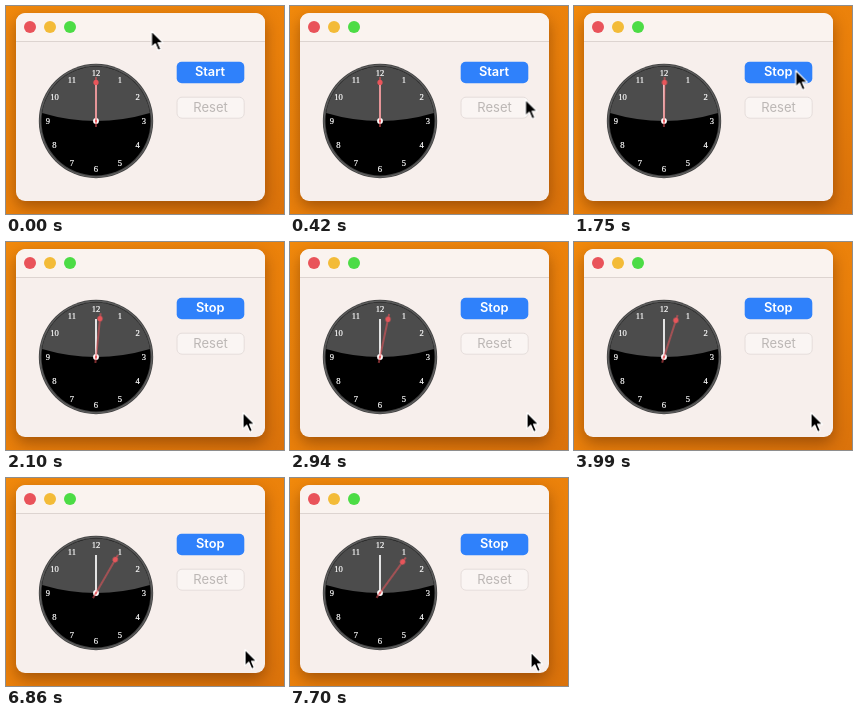
Write an HTML page that moves like this. It is 278 by 208 pixels and loops after 8000 ms.

```html
<!DOCTYPE html>
<html lang="en">
<head>
<meta charset="utf-8">
<title>Stopwatch</title>
<style>
  html, body { margin: 0; width: 100%; height: 100%; overflow: hidden; }
  body { background: linear-gradient(150deg, #f1890c, #ea800b 55%, #da720b); }
  svg { position: absolute; left: 0; top: 0; display: block; }
  .window {
    position: absolute; left: 10px; top: 7.3px; width: 249px; height: 187.4px;
    border-radius: 9px; background: #f7efec;
    box-shadow: 0 6px 15px rgba(60, 20, 0, .4);
  }
  .label { font: 600 12.8px Inter, Roboto, sans-serif; text-anchor: middle; }
  .label.disabled { font-weight: 400; font-size: 13px; }
  .numerals { font: 8.6px "Liberation Serif", "Noto Serif", serif; text-anchor: middle; fill: #fff; stroke: #fff; stroke-width: .2; }

  .cursor, .second, .press, .start, .stop { animation: 8s step-end infinite; }
  .cursor { animation-name: point; }
  .second { animation-name: tick; }
  .press { animation-name: press; }
  .start { animation-name: fade-out; }
  .stop { animation-name: fade-in; }

  /* Everything advances in 70 ms steps; 1% is 80 ms. */
  @keyframes point {
    0% { transform: translate(145.5px, 25px); }
    .875% { transform: translate(145.5px, 25px); animation-timing-function: steps(6, jump-start); }
    6.125% { transform: translate(235.5px, 93.5px); animation-timing-function: steps(5, jump-start); }
    10.5% { transform: translate(221.7px, 64.5px); }
    23.625% { transform: translate(221.7px, 64.5px); animation-timing-function: steps(4, jump-start); }
    27.125% { transform: translate(237px, 170.5px); }
    84% { transform: translate(237px, 170.5px); animation-timing-function: steps(3, jump-start); }
    86.625% { transform: translate(239px, 171.5px); }
    90.125% { transform: translate(239px, 171.5px); animation-timing-function: steps(2, jump-start); }
    91.875% { transform: translate(239px, 173px); }
    92.75% { transform: translate(239px, 173px); animation-timing-function: steps(5, jump-start); }
    97.125%, 100% { transform: translate(241px, 174.2px); }
  }
  @keyframes tick {
    0% { transform: rotate(0); }
    21.875% { transform: rotate(.8deg); }
    23.625% { transform: rotate(3.5deg); }
    24.5% { transform: rotate(6deg); }
    35.875% { transform: rotate(9deg); }
    36.75% { transform: rotate(12deg); }
    49% { transform: rotate(15deg); }
    49.875% { transform: rotate(18deg); }
    62.125% { transform: rotate(21deg); }
    63% { transform: rotate(24deg); }
    77% { transform: rotate(27deg); }
    77.875% { transform: rotate(30deg); }
    90.125% { transform: rotate(33deg); }
    91%, 100% { transform: rotate(36deg); }
  }
  @keyframes press {
    0% { fill: #2f81fb; }
    9.625% { fill: #2974ea; }
    11.375%, 100% { fill: #2f81fb; }
  }
  @keyframes fade-out {
    0% { opacity: 1; }
    11.375% { opacity: 1; animation-timing-function: steps(3, jump-start); }
    14%, 100% { opacity: 0; }
  }
  @keyframes fade-in {
    0% { opacity: 0; }
    11.375% { opacity: 0; animation-timing-function: steps(3, jump-start); }
    14%, 100% { opacity: 1; }
  }
</style>
</head>
<body>
<div class="window"></div>
<svg width="278" height="208" viewBox="0 0 278 208">
  <!-- title bar -->
  <path d="M10 35V16.3a9 9 0 0 1 9-9h231a9 9 0 0 1 9 9v18.7z" fill="#faf3ef"/>
  <path d="M10 35.5h249" stroke="#ddd4d0"/>
  <circle cx="24" cy="21" r="6" fill="#e9535a"/>
  <circle cx="44" cy="21" r="6" fill="#f3bb38"/>
  <circle cx="64" cy="21" r="6" fill="#4cdc45"/>

  <!-- buttons -->
  <rect class="press" x="170.7" y="55.8" width="67.6" height="21.4" rx="5" fill="#2f81fb"/>
  <g class="label" fill="#fff">
    <text class="start" x="204" y="70.4">Start</text>
    <text class="stop" x="204.3" y="70.4">Stop</text>
  </g>
  <rect x="171" y="91.2" width="67.2" height="21" rx="5" fill="#faf5f3" stroke="#e3dbd8" stroke-width=".9"/>
  <text class="label disabled" x="204.5" y="105.5" fill="#bcb7b5">Reset</text>

  <!-- clock -->
  <g transform="translate(90 115)">
    <circle r="57.2" fill="#444"/>
    <circle r="56" fill="none" stroke="#626262"/>
    <circle r="54.5" fill="#000"/>
    <path d="M-53.9-8A54.5 54.5 0 0 1 53.9-8Q0 8-53.9-8z" fill="#4c4c4c"/>
    <g class="numerals" id="numerals"></g>
    <path d="M0 0V-38" stroke="#fff" stroke-width="1.7"/>
    <circle r="2.9" fill="#fff"/>
    <g class="second" fill="#e8555a" stroke="#e8555a">
      <path d="M0 6V-44" stroke-width="1.1"/>
      <circle cy="-38.6" r="2.6" stroke="none"/>
      <circle r="1.2" stroke="none"/>
    </g>
  </g>

  <path class="cursor" d="M0 0v16.4l3.8-3.6 2.9 6.6 2.7-1.2-2.8-6.4h5.1z"
        fill="#000" stroke="#fff" stroke-width="1.2" stroke-linejoin="round"/>
</svg>
<script>
  const numerals = document.getElementById("numerals");
  for (let hour = 1; hour <= 12; hour++) {
    const angle = hour * Math.PI / 6;
    const text = document.createElementNS("http://www.w3.org/2000/svg", "text");
    text.setAttribute("x", 48 * Math.sin(angle));
    text.setAttribute("y", 3.2 - 48 * Math.cos(angle));
    text.textContent = hour;
    numerals.append(text);
  }
</script>
</body>
</html>
```
